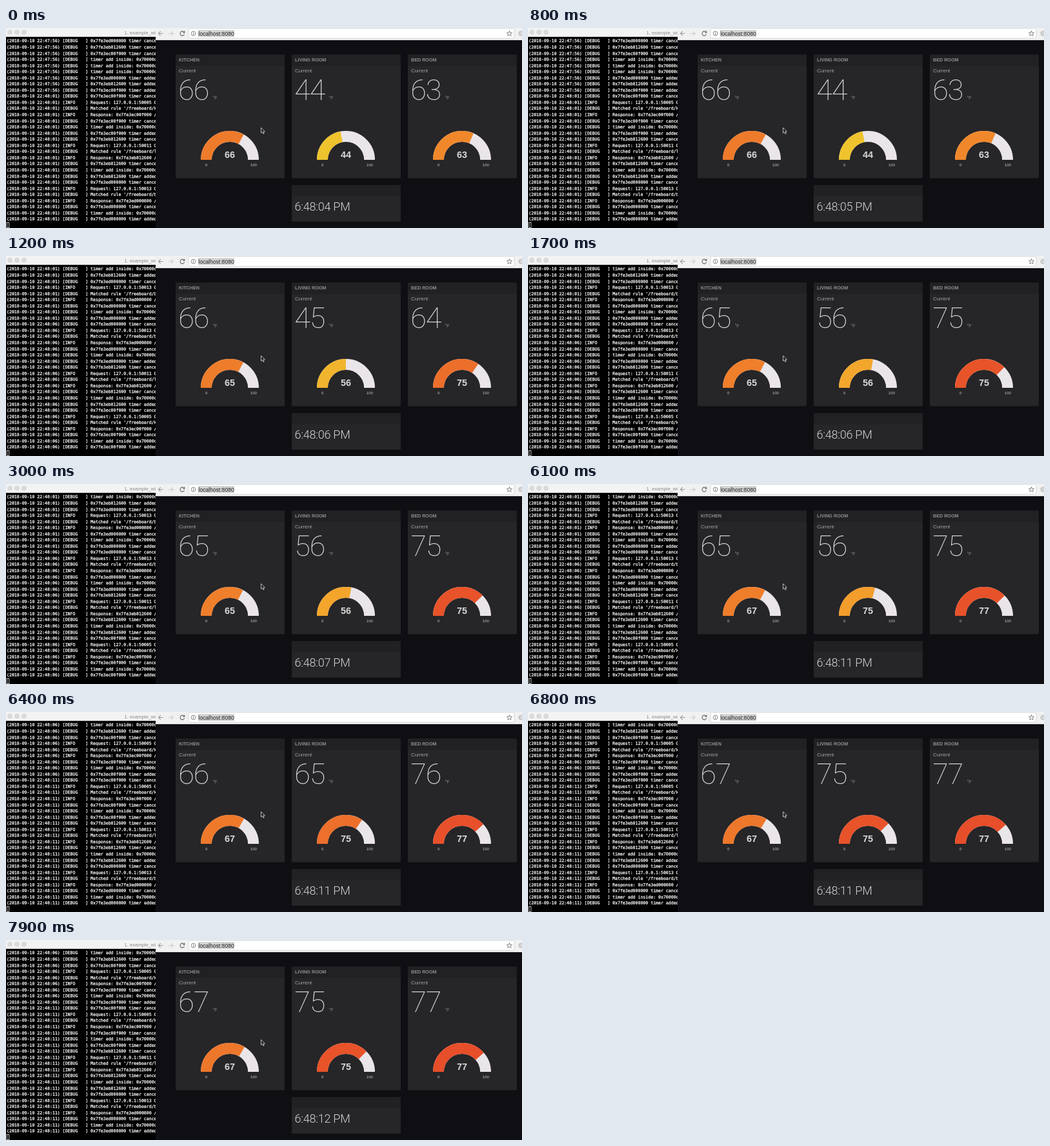
An HTML page with a canvas for the animation above (8000 ms loop, 800 by 311 pixels).

```html
<!DOCTYPE html>
<html lang="en">
<head>
<meta charset="utf-8">
<title>Temperature dashboard</title>
<style>
html, body { margin: 0; width: 100%; height: 100%; overflow: hidden; background: #0f0e13; }
canvas { display: block; }
</style>
</head>
<body>
<canvas id="stage" width="800" height="311"></canvas>
<script>
const ctx = document.getElementById('stage').getContext('2d');
const LOOP = 8000, FRAME = 100;
const SANS = '"Liberation Sans", Arial, sans-serif';
const THIN = 'Roboto, "Liberation Sans", sans-serif';
const MONO = '"DejaVu Sans Mono", monospace';

const rooms = [
  { name: 'KITCHEN', x: 263, temps: [66, 65, 67] },
  { name: 'LIVING ROOM', x: 443, temps: [44, 56, 75] },
  { name: 'BED ROOM', x: 623, temps: [63, 75, 77] }
];
const updates = [1040, 6094];   // when new readings arrive

// Gauge colour stops: value, r, g, b
const stops = [
  [44, 238, 195, 45], [56, 243, 165, 44], [63, 240, 136, 43],
  [66, 238, 123, 43], [75, 232, 83, 42], [77, 231, 78, 42]
];

// ---- server log ----
const timers = {
  k: ['0x7fe3ec00f000', 50005, 'kitchen'],
  l: ['0x7fe3eb812600', 50011, 'living'],
  b: ['0x7fe3ed000800', 50013, 'bed']
};
const ADD = 'timer add inside: 0x70000c1a5000';
const logLine = (time, text, level = 'DEBUG') =>
  `(2018-09-10 ${time}) [${level.padEnd(8)}] ${text}`;

function requests(time, order) {
  return [...order].flatMap(key => {
    const [id, port, path] = timers[key];
    return [
      logLine(time, `${id} timer canceled`),
      logLine(time, `Request: 127.0.0.1:${port} GET`, 'INFO'),
      logLine(time, `Matched rule '/freeboard/${path}'`),
      logLine(time, `Response: ${id} /freeboard`, 'INFO'),
      logLine(time, `${id} timer canceled`),
      logLine(time, ADD),
      logLine(time, `${id} timer added`)
    ];
  });
}
const ids = [...'blk'].map(key => timers[key][0]);
const log = [
  ...ids.map(id => `${id} timer canceled`),
  ADD, ADD, ADD,
  ...ids.map(id => `${id} timer added`)
].map(text => logLine('22:47:56', text)).concat(
  requests('22:48:01', 'klb'),
  requests('22:48:06', 'blk'),
  requests('22:48:11', 'klb')
);

// ---- drawing helpers ----
function rect(x, y, w, h, color) {
  ctx.fillStyle = color;
  ctx.fillRect(x, y, w, h);
}
function text(str, x, y, font, color, { align = 'left', spacing = 0, weight = 0 } = {}) {
  ctx.font = font;
  ctx.fillStyle = color;
  ctx.textAlign = align;
  ctx.letterSpacing = spacing + 'px';
  ctx.fillText(str, x, y);
  if (weight) {
    ctx.strokeStyle = color;
    ctx.lineWidth = weight;
    ctx.strokeText(str, x, y);
  }
}
function dot(x, y, r, fill, line) {
  ctx.beginPath();
  ctx.arc(x, y, r, 0, 7);
  if (fill) { ctx.fillStyle = fill; ctx.fill(); }
  if (line) { ctx.strokeStyle = line; ctx.lineWidth = 0.8; ctx.stroke(); }
}
function stroke(path, color, width = 1.1) {
  ctx.strokeStyle = color;
  ctx.lineWidth = width;
  ctx.stroke(new Path2D(path));
}

// ---- values over time ----
const clamp = n => Math.min(1, Math.max(0, n));
const countSince = (t, delay) => updates.filter(u => t >= u + delay).length;

function ease(temps, t, delay, duration, curve) {
  const n = countSince(t, delay);
  if (!n) return temps[0];
  const p = curve(clamp((t - updates[n - 1] - delay) / duration));
  return temps[n - 1] + (temps[n] - temps[n - 1]) * p;
}
const arcEase = p => p ** 0.48;
const swing = p => 0.5 - Math.cos(p * Math.PI) / 2;

function heat(v) {
  let i = 1;
  while (i < stops.length - 1 && v > stops[i][0]) i++;
  const a = stops[i - 1], b = stops[i];
  const p = clamp((v - a[0]) / (b[0] - a[0]));
  return `rgb(${[1, 2, 3].map(c => Math.round(a[c] + (b[c] - a[c]) * p))})`;
}

// ---- scene parts ----
function terminal(t) {
  rect(0, 0, 232, 311, '#000');
  const first = 21 * countSince(t, 100);
  log.slice(first, first + 30).forEach((line, i) =>
    text(line, 1, 22.4 + i * 9.55, '6.56px ' + MONO, '#fff', { weight: 0.25 }));
  ctx.strokeStyle = '#ccc';
  ctx.lineWidth = 0.9;
  ctx.strokeRect(1.5, 302.5, 3.2, 8);
  rect(0, 0, 232, 13.5, '#f3f3f3');
  rect(0, 13, 232, 0.8, '#c9c9c9');
  [6, 17, 28].forEach(x => dot(x, 6.5, 3.4, '#dcdcdc', '#cdcdcd'));
  text('1. example_with', 183.5, 9.6, '7.6px ' + SANS, '#8a8a8a');
}

function toolbar() {
  rect(232, 0, 568, 19, '#f1f1f1');
  rect(232, 18, 568, 1, '#dadada');
  ctx.beginPath();
  ctx.roundRect(283, 0.5, 505, 15.5, 2);
  ctx.fillStyle = '#fff';
  ctx.fill();
  ctx.strokeStyle = '#d0d0d0';
  ctx.lineWidth = 0.8;
  ctx.stroke();
  stroke('M243.5 8.5H236.5M239.7 5.2L236.5 8.5L239.7 11.8', '#999');
  stroke('M252 8.5H259M255.8 5.2L259 8.5L255.8 11.8', '#ccc');
  stroke('M276.2 6.6A3.4 3.4 0 1 0 276.6 9.6M276.8 4.6V7.2H274.2', '#666');
  dot(290.5, 8.5, 3.4, null, '#666');
  rect(290.1, 7.8, 0.9, 2.8, '#666');
  rect(290.1, 6.3, 0.9, 0.9, '#666');
  rect(298, 3, 56, 11, '#d3d3d3');
  text('localhost:8080', 298.3, 11.6, '8.6px ' + SANS, '#222');
  stroke('M780.5 4.4L781.6 7.3L784.6 7.4L782.3 9.3L783.1 12.2L780.5 10.6L777.9 12.2L778.7 9.3L776.4 7.4L779.4 7.3Z', '#666', 0.8);
  dot(798.5, 8.5, 3.5, '#d5d5d5', '#aaa');
}

function panel(x, y, h) {
  rect(x, y, 169, h, '#262527');
  rect(x, y, 169, 17.5, '#212022');
}

function gauge(cx, value, label) {
  const cy = 205, outer = 45, inner = 28.1;
  const end = Math.PI * (1 + value / 100);
  ctx.lineWidth = outer - inner;
  [[Math.PI, 2 * Math.PI, '#e9e5e9'], [Math.PI, end, heat(value)]].forEach(([a, b, color]) => {
    ctx.beginPath();
    ctx.arc(cx, cy, (outer + inner) / 2, a, b);
    ctx.strokeStyle = color;
    ctx.stroke();
  });
  const center = { align: 'center' };
  text(label, cx, 202.2, 'bold 14.4px ' + SANS, '#d9d8d9', center);
  text('0', cx - 36.3, 215, '6px ' + SANS, '#cccbcc', center);
  text('100', cx + 36.8, 215, '6px ' + SANS, '#cccbcc', center);
}

function room({ name, x, temps }, t) {
  panel(x, 41.5, 192);
  text(name, x + 5, 52.2, 'bold 7.2px ' + SANS, '#8f8e90');
  text('Current', x + 5, 68.8, '7.9px ' + SANS, '#a5a4a6');
  const shown = Math.round(ease(temps, t, 70, 500, swing));
  text(shown, x + 4.3, 112.4, '100 45px ' + THIN, '#dddcde', { spacing: -1.1 });
  text('°F', x + 57.5, 111, '7px ' + SANS, '#8d8c8e');
  gauge(x + 84, ease(temps, t, 0, 700, arcEase), temps[countSince(t, 0)]);
}

function clock(t) {
  panel(443, 244.5, 56.5);
  const sec = 4 + Math.floor((t + 900) / 1000);
  text(`6:48:${String(sec).padStart(2, '0')} PM`, 447.5, 283.9,
    '300 18px ' + THIN, '#d6d5d7', { spacing: -0.25 });
}

function pointer() {
  const p = new Path2D('M395.5 155V163.2L397.4 161.5L398.8 164.6L400.2 164L398.8 161H401.3Z');
  ctx.fillStyle = '#111';
  ctx.fill(p);
  ctx.strokeStyle = '#e8e8e8';
  ctx.lineWidth = 0.8;
  ctx.stroke(p);
}

function draw(now) {
  // Ten pictures a second, with a little slack for timer jitter
  const t = Math.floor((now + 10) / FRAME) * FRAME % LOOP;
  terminal(t);
  rect(232, 0, 568, 311, '#0f0e13');
  toolbar();
  rooms.forEach(r => room(r, t));
  clock(t);
  pointer();
  requestAnimationFrame(draw);
}
requestAnimationFrame(draw);
</script>
</body>
</html>
```
